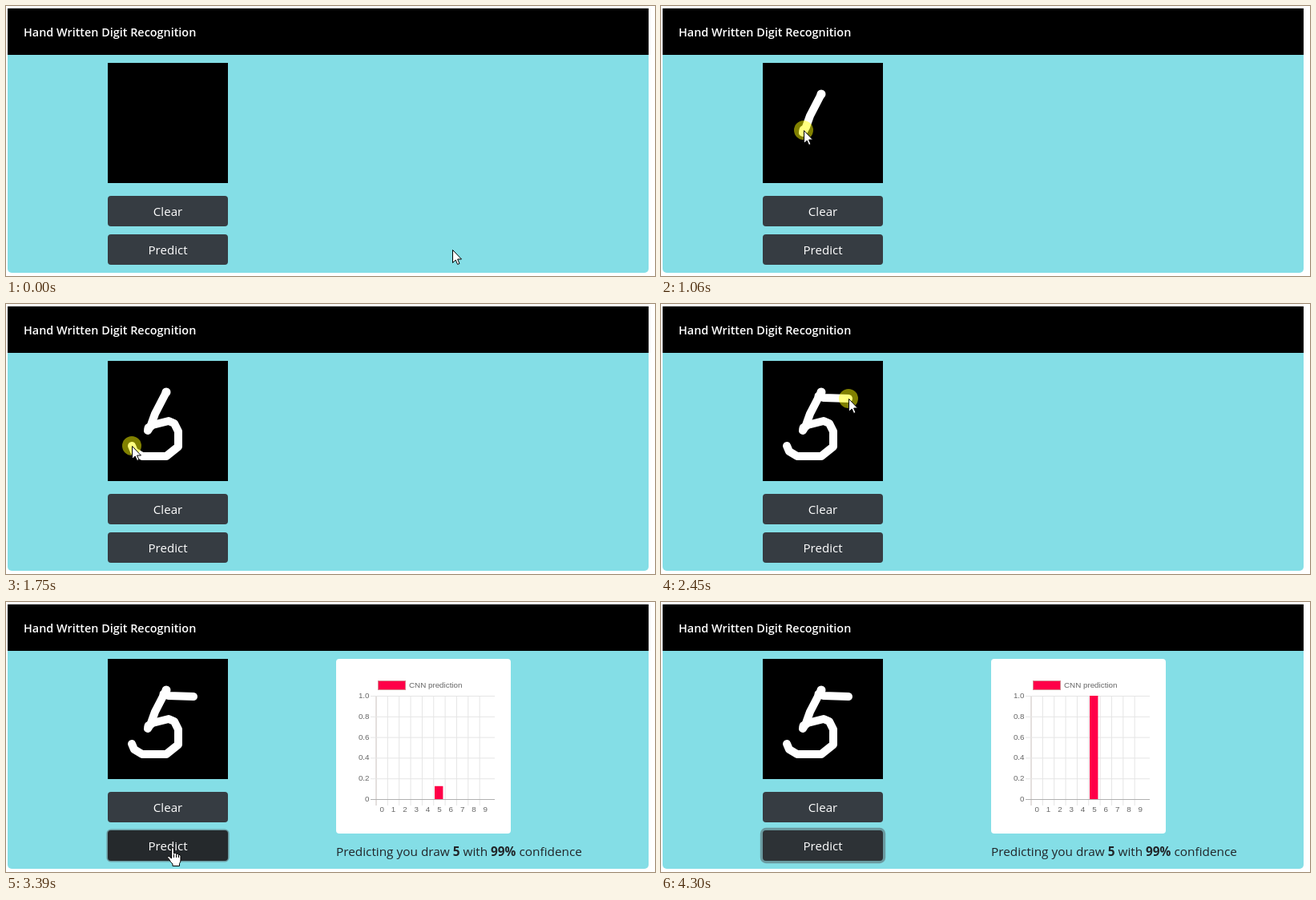
Recreate the animation shown at these times as an HTML page with a canvas. Size 810 by 337 pixels, loop 5.09 s.

```html
<!DOCTYPE html>
<html lang="en">
<head>
<meta charset="utf-8">
<title>Hand Written Digit Recognition</title>
<style>
html, body { margin: 0; width: 100%; height: 100%; overflow: hidden; background: #fff; }
canvas { display: block; width: 810px; height: 337px; }
</style>
</head>
<body>
<canvas id="stage" width="810" height="337"></canvas>
<script>
const ctx = document.getElementById('stage').getContext('2d');
const LOOP = 5090, TICK = 77, TICK_LEAD = 22; // ms; the screen refreshes once per tick
const UI = '"Open Sans", "Noto Sans", sans-serif';
const CHART = '"Liberation Sans", Arial, sans-serif';
const PINK = '#ff0048';
const PRESS = 43, RESULT = 44, CURSOR_GONE = 55; // ticks

// Pointer moves: ticks, mouse button, corner points
const moves = [
  { from: 0, to: 7, points: [[557, 304], [252, 258], [199, 114]] },
  { from: 8, to: 14, down: true, points: [[200, 110], [186, 137], [181, 151], [177, 158], [178, 154]] },
  { from: 14, to: 23, down: true, points: [[178, 155], [183, 151], [203, 146], [210, 149], [215, 159],
    [215, 178], [200, 190], [170, 190], [160, 184], [157, 177]] },
  { from: 24, to: 28, points: [[157, 177], [196, 116]] },
  { from: 29, to: 32, down: true, points: [[197, 115], [203, 117], [234, 118]] },
  { from: 34, to: 40, points: [[234, 118], [219, 190], [206, 306]] },
  { from: PRESS, to: RESULT, down: true, points: [[206, 306]] },
  { from: RESULT, to: CURSOR_GONE, points: [[206, 306], [200, 305]] }
];
const buttons = [{ label: 'Clear', y: 237 }, { label: 'Predict', y: 285 }];

// The part of a move's polyline covered so far, slowing toward its end
function trace({ from, to, points }, tick) {
  const k = Math.sin(Math.min(1, (tick - from) / (to - from)) * Math.PI / 2);
  const lengths = points.slice(1).map(([x, y], i) => Math.hypot(x - points[i][0], y - points[i][1]));
  let left = k * lengths.reduce((a, b) => a + b, 0);
  const done = [points[0]];
  for (let i = 0; i < lengths.length && left > 0; i++) {
    const part = Math.min(1, left / lengths[i]);
    const [x, y] = points[i], [nx, ny] = points[i + 1];
    done.push([x + (nx - x) * part, y + (ny - y) * part]);
    left -= lengths[i];
  }
  return done;
}

function rect(x, y, w, h, color) {
  ctx.fillStyle = color;
  ctx.fillRect(x, y, w, h);
}

function round(x, y, w, h, r, color) {
  ctx.fillStyle = color;
  ctx.beginPath();
  ctx.roundRect(x, y, w, h, r);
  ctx.fill();
}

function disc(x, y, r, color) {
  ctx.fillStyle = color;
  ctx.beginPath();
  ctx.arc(x, y, r, 0, 2 * Math.PI);
  ctx.fill();
}

function text(str, x, y, font, color, align = 'left') {
  ctx.font = font;
  ctx.fillStyle = color;
  ctx.textAlign = align;
  ctx.fillText(str, x, y);
  return x + ctx.measureText(str).width;
}

function pad(past, tick) {
  ctx.save();
  rect(127, 71, 150, 150, '#000');
  ctx.beginPath();
  ctx.rect(127, 71, 150, 150);
  ctx.clip();
  ctx.strokeStyle = '#fff';
  ctx.lineWidth = 10;
  ctx.lineCap = ctx.lineJoin = 'round';
  for (const move of past.filter(m => m.down)) {
    const line = trace(move, tick);
    disc(...line[0], 5.5, '#fff');
    ctx.beginPath();
    line.forEach(p => ctx.lineTo(...p));
    ctx.stroke();
  }
  ctx.restore();
}

function button({ label, y }, hover, tick) {
  let color = hover ? '#25292c' : '#363c42';
  if (label === 'Predict' && tick >= RESULT) {
    const ring = 3.2 * Math.min(1, (tick - PRESS) / 2);
    round(127 - ring, y - ring, 150 + 2 * ring, 38 + 2 * ring, 4 + ring, 'rgba(82,88,93,.5)');
    if (tick > RESULT) color = '#2d3236';
  }
  round(127, y, 150, 38, 4, color);
  text(label, 202, y + 25, '15.1px ' + UI, '#fff', 'center');
}

function chart(tick) {
  const left = 461.5, top = 117, base = 246, colW = 14.35, rowH = (base - top) / 5;
  const font = '9.8px ' + CHART;
  round(412, 71, 218, 218, 4, '#fff');
  rect(464, 98, 35, 12, '#d8848f');
  rect(465, 99, 33, 10, PINK);
  text('CNN prediction', 503, 107, font, '#666');
  for (let i = 0; i < 10; i++) {
    const x = left + i * colW;
    rect(x, top, 1, 137, i ? '#e5e5e5' : '#c9bfbc');
    text(i, x + colW / 2 + .5, 262, font, '#666', 'center');
  }
  for (let i = 0; i < 6; i++) {
    const y = base - i * rowH;
    rect(455, y, 155, 1, i ? '#e5e5e5' : '#b0b0b0');
    text(i ? (i / 5).toFixed(1) : '0', 453.5, y + 3, font, '#666', 'right');
  }
  const k = Math.min(1, ((tick - RESULT) * TICK + 33) / 1000);
  const h = (base - top) * (1 - (1 - k) ** 4);
  rect(535, base - h, 10.4, h, PINK);

  let x = 412;
  ['Predicting you draw ', '5', ' with ', '99%', ' confidence'].forEach((s, i) => {
    x = text(s, x, 317, `${i % 2 ? 700 : 400} 15.35px ${UI}`, '#212529');
  });
}

const arrow = new Path2D('M.5 .5V16.5L4.2 13L6.6 18.5L9 17.5L6.6 12H11.5Z');
const hand = new Path2D('M.5 2Q.5 .5 2 .5T3.5 2V8Q5.5 6.5 6.8 8.6Q8.5 7.5 9.6 9.4Q12 8.6 12 11.5V16' +
  'Q12 18.5 10.5 20.5V23.5H2V21Q-1 18.5 -2.5 15Q-5.5 12.5 -4 11.4Q-2.5 10.5 .5 14Z');

function cursor(shape, x, y) {
  ctx.save();
  ctx.translate(Math.round(x), Math.round(y));
  ctx.fillStyle = '#fff';
  ctx.strokeStyle = '#000';
  ctx.lineWidth = 1;
  ctx.fill(shape);
  ctx.stroke(shape);
  if (shape === hand) for (const lx of [3, 6, 9]) rect(lx, 9, 1, 4, '#000');
  ctx.restore();
}

function draw(tick) {
  const past = moves.filter(m => m.from <= tick);
  const move = past[past.length - 1];
  const [x, y] = trace(move, tick).pop();
  const over = b => x >= 127 && x < 277 && y >= b.y && y < b.y + 38;

  rect(0, 0, 810, 337, '#fff');
  round(2, 3, 800, 330, [0, 0, 5, 5], '#84dee6');
  rect(2, 3, 800, 58, '#000');
  text('Hand Written Digit Recognition', 22, 38, '600 14.4px ' + UI, '#fff');
  pad(past, tick);
  buttons.forEach(b => button(b, over(b), tick));
  if (tick >= RESULT) chart(tick);
  if (move.down) disc(x, y, 12, 'rgba(255,255,0,.5)');
  if (tick < CURSOR_GONE) cursor(buttons.some(over) ? hand : arrow, x, y);
}

const start = performance.now();
function loop() {
  const t = (performance.now() - start) % LOOP;
  draw(Math.floor((t + TICK_LEAD) / TICK));
  requestAnimationFrame(loop);
}
loop();
</script>
</body>
</html>
```
